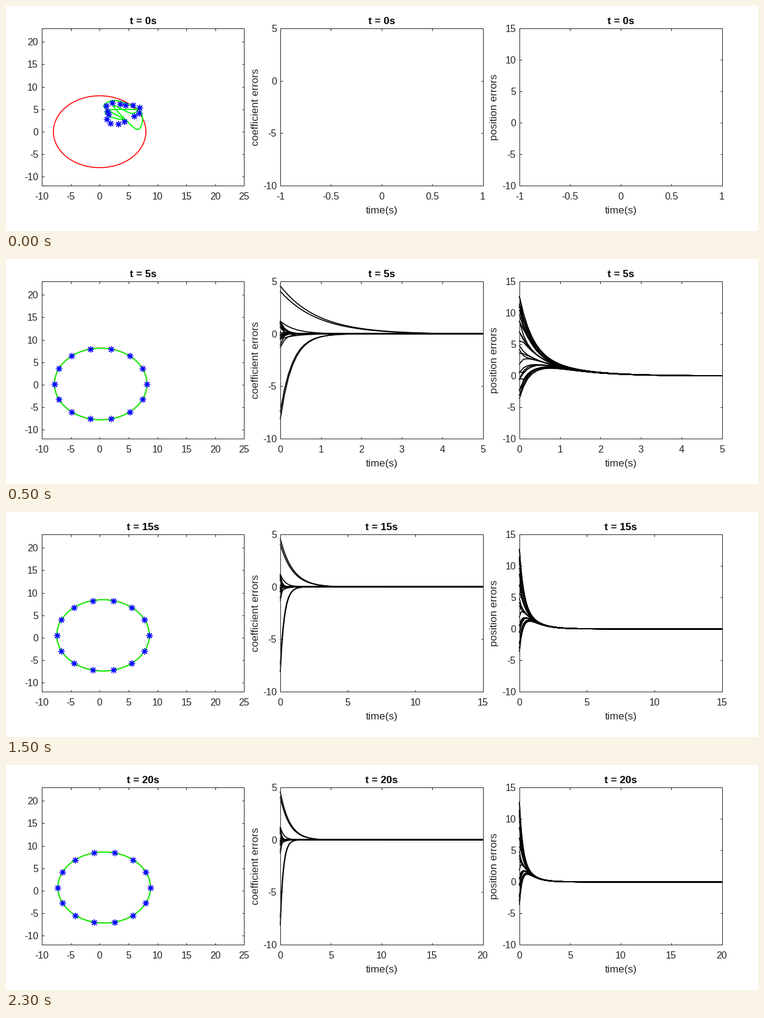
Write a matplotlib script that moves like this. It is 1239x372 px and loops after 2500 ms.

```python
import numpy as np
import matplotlib.pyplot as plt
from matplotlib.animation import FuncAnimation

W, H, DPI = 1239, 372, 100
PX = 72 / DPI  # points per pixel
TOP, BOTTOM, PANEL_WIDTH = 37, 297, 333.5
GRAY = (0.15, 0.15, 0.15)
RADIUS, AGENTS = 8, 14

plt.rcParams.update({
    "font.family": "Liberation Sans",
    "axes.unicode_minus": False,
    "axes.edgecolor": GRAY,
    "axes.linewidth": PX,
})
fig = plt.figure(figsize=(W / DPI, H / DPI), dpi=DPI, facecolor="white")


def pixel_text(x, y, text, size, **style):
    return fig.text(x / W, 1 - y / H, text, fontsize=size * PX, **style)


def make_panel(left, ymin, ymax, ylabel=None):
    ax = fig.add_axes([left / W, 1 - BOTTOM / H,
                       PANEL_WIDTH / W, (BOTTOM - TOP) / H])
    ax.set_ylim(ymin, ymax)
    ax.set_yticks(range(-10, ymax + 1, 5))
    ax.tick_params(direction="in", top=True, right=True, length=3.5 * PX,
                   width=PX, color=GRAY, labelcolor=GRAY, labelsize=16 * PX)
    ax.tick_params(axis="x", pad=10.5 * PX)
    ax.tick_params(axis="y", pad=6 * PX)
    middle = left + PANEL_WIDTH / 2
    title = pixel_text(middle, 30, "", 17, weight="bold",
                       ha="center", va="baseline")
    if ylabel:
        pixel_text(left - 41, (TOP + BOTTOM) / 2, ylabel, 17.2, color=GRAY,
                   rotation=90, ha="center", va="center")
        pixel_text(middle, 343, "time(s)", 17.2, color=GRAY,
                   ha="center", va="baseline")
    return ax, title


def set_x_ticks(ax, ticks):
    ax.set_xlim(ticks[0], ticks[-1])
    ax.set_xticks(ticks, [f"{v:g}" for v in ticks])


def smooth_loop(points, steps=20):
    """Closed Catmull-Rom curve through the points."""
    p = np.asarray(points, float)
    a, b, c, d = (np.roll(p, s, axis=0)[:, None] for s in (1, 0, -1, -2))
    u = np.linspace(0, 1, steps)[None, :, None]
    curve = 0.5 * (2 * b + (c - a) * u + (2 * a - 5 * b + 4 * c - d) * u**2
                   + (3 * b - a - 3 * c + d) * u**3)
    return curve.reshape(-1, 2).T


def ring(now, count, lag=0.0, closed=False):
    """Circle that drifts up and right while flattening slightly."""
    angle = np.linspace(0, 2 * np.pi, count, endpoint=closed)
    height = RADIUS * (1 - 0.0006 * now)
    return (0.04 * now - lag + RADIUS * np.cos(angle),
            0.036 * now - lag + height * np.sin(angle))


def wavy_ring():
    """Agents on an open, wavy ellipse."""
    k = np.arange(AGENTS)
    angle = np.radians(np.linspace(-21, 282, AGENTS))
    reach = 0.96 + 0.2 * np.cos(2 * np.pi * (k - 2) / 4.5)
    return 3.8 + 3 * reach * np.cos(angle), 4.1 + 2.4 * reach * np.sin(angle)


# Shape panel
shape_ax, shape_title = make_panel(59, -12, 23)
set_x_ticks(shape_ax, range(-10, 26, 5))
target, = shape_ax.plot([], [], color="red", lw=1.6 * PX)
contour, = shape_ax.plot([], [], color="lime", lw=1.9 * PX)
agents, = shape_ax.plot([], [], ls="", marker=(8, 2, 0), color="blue",
                        ms=10.5 * PX, mew=1.3 * PX)
start_contour = smooth_loop([
    (7.4, 2.6), (6.6, 0.5), (4.6, 2.5), (2.4, 5.8), (5.4, 4.1), (6.3, 4.9),
    (1.4, 4.8), (1.5, 3.5), (4.2, 2.75), (0.8, 5.5), (2.7, 6.95), (6.6, 5.1)])

# Error histories
rng = np.random.default_rng(4)
step = np.arange(201)[:, None]
t = step * 0.1
center_decay = np.exp(-1.07 * t)
radius_decay = np.exp(-3.3 * t)
lag = -0.03 * (1 - center_decay)
center = np.array([4.55, 4.05])
radius = np.array([-8.1, -7.4])

small = rng.uniform(-1.5, 1.2, 18) * rng.uniform(-0.1, 0.5, 18) ** step
coefficient_errors = np.hstack([
    center * center_decay + lag,
    radius * radius_decay,
    np.array([1.2, -0.5]) * np.exp(-2.8 * t),
    small])

theta = 2 * np.pi * np.arange(AGENTS) / AGENTS
waves = np.outer(radius, np.ones(AGENTS)) * [np.cos(theta), np.sin(theta)]
jitter = rng.uniform(-1.5, 1.5, 2 * AGENTS)
fade = rng.uniform(-0.1, 0.65, 2 * AGENTS)
position_errors = (np.repeat(center, AGENTS) * center_decay
                   + waves.ravel() * radius_decay
                   + jitter * fade ** step + lag)

coef_ax, coef_title = make_panel(452, -10, 5, "coefficient errors")
pos_ax, pos_title = make_panel(846, -10, 15, "position errors")
histories = [
    (ax.plot([], [], color="black", lw=1.7 * PX, clip_on=False)[0], values)
    for ax, errors in ((coef_ax, coefficient_errors),
                       (pos_ax, position_errors))
    for values in errors.T]


def draw(frame):
    now = 5 * frame
    for title in (shape_title, coef_title, pos_title):
        title.set_text(f"t = {now}s")

    target.set_data(*ring(now, 200, closed=True))
    if now:
        contour.set_data(*ring(now, 200, lag=0.02, closed=True))
        agents.set_data(*ring(now, AGENTS, lag=0.02))
        ticks = np.arange(0, now + 1, {5: 1, 10: 2}.get(now, 5))
    else:
        contour.set_data(*start_contour)
        agents.set_data(*wavy_ring())
        ticks = np.linspace(-1, 1, 5)

    for ax in (coef_ax, pos_ax):
        set_x_ticks(ax, ticks)
    shown = 10 * now + 1 if now else 0
    for line, values in histories:
        line.set_data(t[:shown, 0], values[:shown])
    return []


anim = FuncAnimation(fig, draw, frames=5, interval=500, repeat=True)
plt.show()
```
